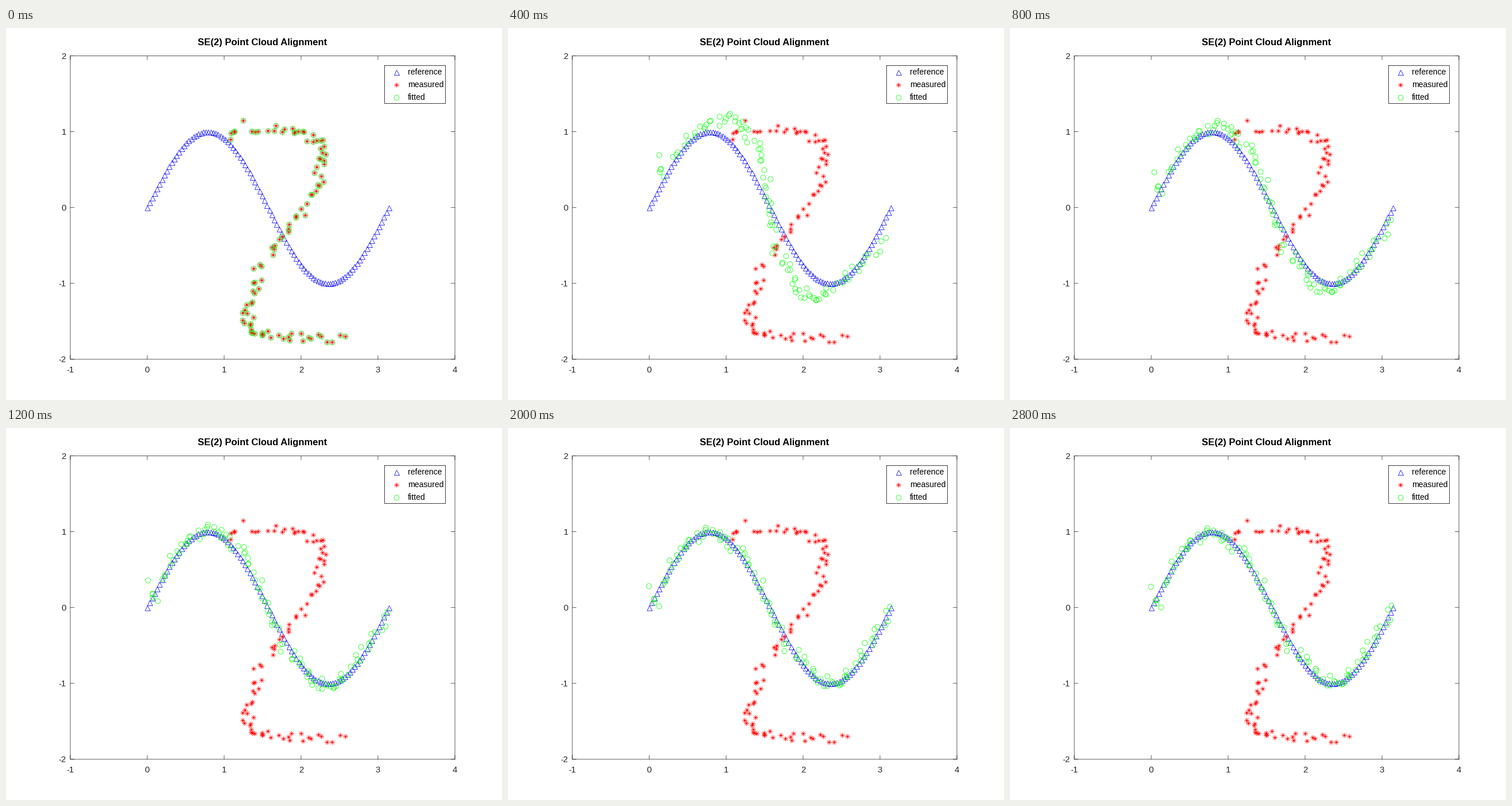
A matplotlib script for the animation above (3200 ms loop, 864 by 648 pixels).

```python
import numpy as np
import matplotlib.pyplot as plt
from matplotlib.animation import FuncAnimation
from matplotlib.path import Path

W, H, DPI = 864, 648, 108
LEFT, RIGHT, TOP, BOTTOM = 112, 782, 48.5, 577
UX, UY = (RIGHT - LEFT) / 5, (BOTTOM - TOP) / 4
GREY = (0.15, 0.15, 0.15)
BLUE, RED, GREEN = "#0000ff", "#ff0000", "#00ff00"
THIN = 0.5
TICK = 6.7

plt.rcParams["font.family"] = "Liberation Sans"
fig = plt.figure(figsize=(W / DPI, H / DPI), dpi=DPI, facecolor="white")
ax = fig.add_axes([0, 0, 1, 1])
ax.set_xlim(0, W)
ax.set_ylim(H, 0)
ax.axis("off")


def to_px(x, y):
    return LEFT + UX * (x + 1), TOP + UY * (2 - y)


def line(xs, ys, color=GREY):
    ax.plot(xs, ys, color=color, lw=THIN, snap=False)


def box(x0, y0, x1, y1, color):
    line([x0, x1, x1, x0, x0], [y0, y0, y1, y1, y0], color)


def label(x, y, s, size, color="black", ha="left", weight="normal"):
    ax.text(x, y, s, size=size, color=color, ha=ha, va="baseline", weight=weight)


def markers(x, y, shape, color):
    return ax.plot(x, y, ls="none", marker=shape, ms=6, mfc="none", mec=color,
                   mew=THIN, snap=False)[0]


def star():
    """Four crossing strokes, each drawn once."""
    t = np.radians([0, 45, 90, 135])
    tips = np.column_stack([np.cos(t), np.sin(t)])
    verts = np.stack([-tips, tips], axis=1).reshape(-1, 2)
    return Path(verts, [Path.MOVETO, Path.LINETO] * len(t))


def rotate(points, degrees):
    t = np.radians(degrees)
    c, s = np.cos(t), np.sin(t)
    return points @ np.array([[c, s], [-s, c]])


# Measured cloud: the sine turned by -60 degrees, shifted by (1, 1), with noise
SHIFT = np.array([1.0, 1.0])
HOME = np.array([np.pi / 2, 0])
x = np.linspace(0, np.pi, 100)
ref = np.column_stack([x, np.sin(2 * x)])
noise = np.random.default_rng(3).normal(0, 0.04, ref.shape)
cloud = rotate(ref, -60) + SHIFT + noise
pivot = rotate(HOME, -60) + SHIFT


def fit(step):
    """Large first correction, then the remaining angle shrinks by a third."""
    if step == 0:
        return cloud
    angle = 60.6 - 24 * 0.67 ** (step - 1)
    return rotate(cloud - pivot, angle) + HOME


# Axes
box(LEFT, TOP, RIGHT, BOTTOM, GREY)
for v in range(-1, 5):
    px, _ = to_px(v, 0)
    line([px, px], [BOTTOM, BOTTOM - TICK])
    line([px, px], [TOP, TOP + TICK])
    label(px, 600, str(v), 10, GREY, "center")
for v in range(-2, 3):
    _, py = to_px(0, v)
    line([LEFT, LEFT + TICK], [py, py])
    line([RIGHT, RIGHT - TICK], [py, py])
    label(105, py + 5.3, str(v), 10, GREY, "right")
label((LEFT + RIGHT) / 2, 30.3, "SE(2) Point Cloud Alignment", 11.1,
      ha="center", weight="bold")

# Data
STAR = star()
markers(*to_px(*ref.T), "^", BLUE)
markers(*to_px(*cloud.T), STAR, RED)
fitted = markers(*to_px(*fit(0).T), "o", GREEN)

# Legend
box(659.5, 65.5, 765.5, 131.5, "black")
entries = [("reference", "^", BLUE), ("measured", STAR, RED),
           ("fitted", "o", GREEN)]
for k, (name, shape, color) in enumerate(entries):
    y = 76.5 + 22 * k
    markers([680.2], [y], shape, color)
    label(699.8, y + 4.8, name, 9.3)


def update(i):
    fitted.set_data(*to_px(*fit(min(i, 14)).T))
    return [fitted]


anim = FuncAnimation(fig, update, frames=16, interval=200, repeat=True,
                     repeat_delay=0, blit=False)
plt.show()
```
